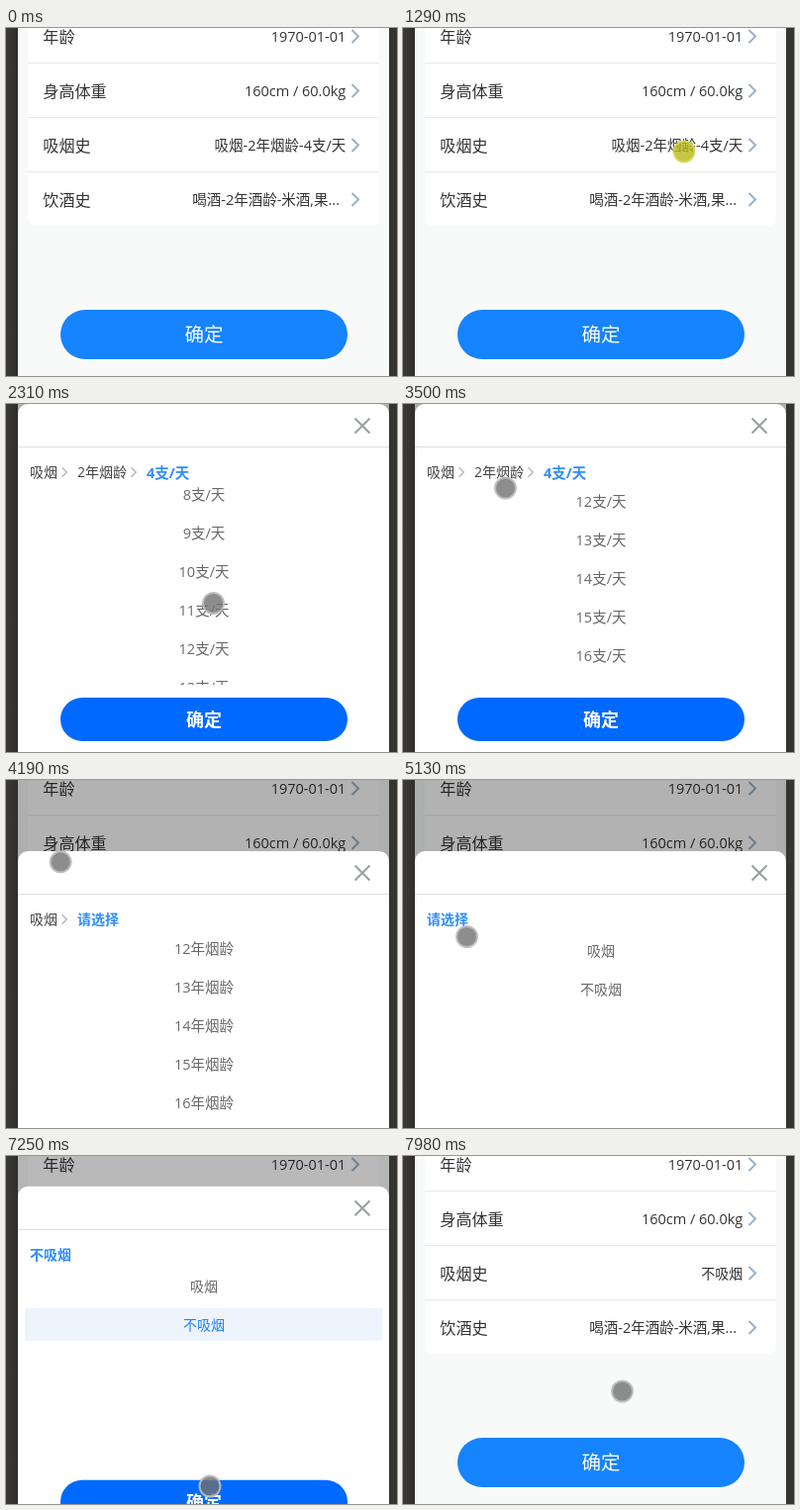
An HTML page that plays this animation: 395 by 352 pixels, repeating every 8000 ms.

```html
<!DOCTYPE html>
<html lang="zh-CN">
<head>
<meta charset="utf-8">
<title>健康信息</title>
<style>
html, body { margin: 0; width: 100%; height: 100%; overflow: hidden; background: #383634; }
svg { display: block; width: 395px; height: 352px; }
text { font-family: "Open Sans", "Noto Sans", "Noto Sans CJK SC", "Noto Sans CJK", sans-serif; }
</style>
</head>
<body>
<svg id="stage" viewBox="0 0 395 352"></svg>
<script>
const LOOP = 8000, ROW = 39, LIST_TOP = 101, MID = 200, PRESS = 150;
const BLUE = '#2f8dff', GREY = '#686868';

// Text placed by the vertical centre of its glyphs.
const text = (str, x, cy, size, fill, extra = '') =>
  `<text x="${x}" y="${cy + size * 0.38}" font-size="${size}" fill="${fill}" ${extra}>${str}</text>`;
const centred = (str, cy, size, fill, extra = '') =>
  text(str, MID, cy, size, fill, `text-anchor="middle" ${extra}`);
const sizeFor = str => /\d/.test(str) ? 14.5 : 14;
const chevron = (x, cy, h, color, width) =>
  `<path d="M${x} ${cy - h}l${h} ${h}l${-h} ${h}" fill="none" stroke="${color}" stroke-width="${width}"/>`;
const rect = (x, y, w, h, fill, r = 0) =>
  `<rect x="${x}" y="${y}" width="${w}" height="${h}" rx="${r}" fill="${fill}"/>`;

function pageRow([label, value, kind = ''], i) {
  const cy = 8.5 + 55 * i;
  return text(label, 37.3, cy, 16.1, '#333') +
    text(value, value.endsWith('...') ? 337 : 343.3, cy, sizeFor(value), '#333',
      `class="${kind}" text-anchor="end"`) +
    chevron(349.5, cy, 6.5, '#98b2cb', 2) +
    (i < 3 ? rect(22, 35 + 55 * i, 355, 1, '#e8e8e8') : '');
}

function tabs(names) {
  let x = 24;
  return names.map((name, i) => {
    if (i === names.length - 1) return text(name, x, 69, sizeFor(name), BLUE, 'font-weight="700"');
    const label = text(name, x, 69, 14, '#444');
    x += 20 + (i ? 50 : 28);
    return label + chevron(x - 15.5, 69, 4.8, '#b4b7bc', 1.4);
  }).join('');
}

const option = (str, i, color = GREY) => centred(str, LIST_TOP + i * ROW, sizeFor(str), color);
const countOptions = unit => Array.from({ length: 20 }, (_, i) => option(i + 1 + unit, i)).join('');
const panel = (names, list, kind = '') =>
  `<g class="panel">${tabs(names)}<g clip-path="url(#list)"><g class="${kind}">${list}</g></g></g>`;

document.getElementById('stage').innerHTML = `
  <defs>
    <clipPath id="phone"><rect x="12" width="375" height="352"/></clipPath>
    <clipPath id="list"><rect x="12" y="84" width="375" height="200"/></clipPath>
    <linearGradient id="edge"><stop offset="0" stop-color="#3d3b39"/><stop offset="1" stop-color="#302e2d"/></linearGradient>
  </defs>
  ${rect(0, 0, 12, 352, 'url(#edge)')}${rect(387, 0, 8, 352, '#363432')}
  <g clip-path="url(#phone)">
    ${rect(12, 0, 375, 352, '#f8fafa')}
    ${rect(22, -20, 355, 220, '#fff', 8)}
    ${[['年龄', '1970-01-01'], ['身高体重', '160cm / 60.0kg'], ['吸烟史', '', 'smoking'],
       ['饮酒史', '喝酒-2年酒龄-米酒,果...']].map(pageRow).join('')}
    ${rect(55, 285, 290, 50, '#1683ff', 25)}
    ${centred('确定', 310, 19.5, '#fff', 'font-weight="500"')}
    <rect id="shade" x="12" width="375" height="352"/>
    <g id="sheet">
      ${rect(12, 0, 375, 440, '#fff', 10)}
      ${rect(12, 43, 375, 1, '#dedede')}
      <path d="M352.5 14.5l15 15m0-15l-15 15" stroke="#9a9ea5" stroke-width="2"/>
      ${panel(['吸烟', '2年烟龄', '4支/天'], countOptions('支/天'), 'scroll')}
      ${panel(['吸烟', '请选择'], countOptions('年烟龄'), 'scroll')}
      ${panel(['请选择'], option('吸烟', 0) + option('不吸烟', 1))}
      ${panel(['不吸烟'], option('吸烟', 0) + rect(19, 123, 361, 33, '#eef4fd') + option('不吸烟', 1, '#1f80ff'))}
      <g id="confirm">${rect(55, 297, 290, 44, '#0069ff', 22)}
        ${centred('确定', 319.5, 18, '#fff', 'font-weight="700"')}</g>
    </g>
  </g>
  <circle id="cursor" r="10.5" stroke-width="2"/>`;

const $ = id => document.getElementById(id);
const panels = document.querySelectorAll('.panel');
const scrollers = document.querySelectorAll('.scroll');
const smoking = document.querySelector('.smoking');

// Each tap leads to the next view: open, years, first choice, chosen, closed.
const taps = [1290, 3600, 4650, 5610, 7050];

// Cursor moves: start, end, x, y.
const moves = [
  [130, 1160, 284, 125], [1840, 2310, 209.5, 201.5], [3180, 3500, 103.5, 85],
  [3500, 3970, 61, 71], [4040, 4640, 24, 146], [4800, 5130, 64.5, 158.5],
  [5130, 5540, 232, 217], [5970, 6220, 204.5, 217.5], [6290, 6930, 206, 334],
  [7500, 7980, 221.5, 238]
];

const progress = (t, from, to) => Math.min(1, Math.max(0, (t - from) / (to - from)));
const smooth = k => k * k * (3 - 2 * k);
const easeOut = k => 1 - (1 - k) ** 4;

function draw(t) {
  const view = taps.filter(tap => t >= tap + PRESS).length;
  const shown = Math.min(3, Math.max(0, view - 1));
  const complete = shown === 0 || shown === 3;
  const open = smooth(progress(t, 1420, 1690)) - smooth(progress(t, 7200, 7480));
  panels.forEach((p, i) => { p.style.display = i === shown ? '' : 'none'; });
  $('confirm').style.display = complete ? '' : 'none';
  $('shade').setAttribute('fill-opacity', 0.3 * open);
  $('sheet').setAttribute('transform', `translate(0 ${complete ? 352 * (1 - open) : 72})`);

  const value = view < 5 ? '吸烟-2年烟龄-4支/天' : '不吸烟';
  smoking.textContent = value;
  smoking.setAttribute('font-size', sizeFor(value));

  const offset = 232 + 200 * easeOut(progress(t, 2250, 3110));
  scrollers.forEach(s => s.setAttribute('transform', `translate(0 ${-offset})`));

  let x = 380, y = 366;
  for (const [from, to, toX, toY] of moves) {
    const k = smooth(progress(t, from, to));
    x += (toX - x) * k;
    y += (toY - y) * k;
  }
  const pressed = taps.some(tap => t >= tap && t < tap + PRESS);
  const cursor = $('cursor');
  cursor.setAttribute('cx', x);
  cursor.setAttribute('cy', y);
  cursor.setAttribute('fill', pressed ? 'rgba(184,184,22,.8)' : 'rgba(112,112,112,.8)');
  cursor.setAttribute('stroke', pressed ? 'rgba(215,215,90,.85)' : 'rgba(190,190,190,.9)');
}

function tick() {
  draw(performance.now() % LOOP);
  requestAnimationFrame(tick);
}
tick();
</script>
</body>
</html>
```
